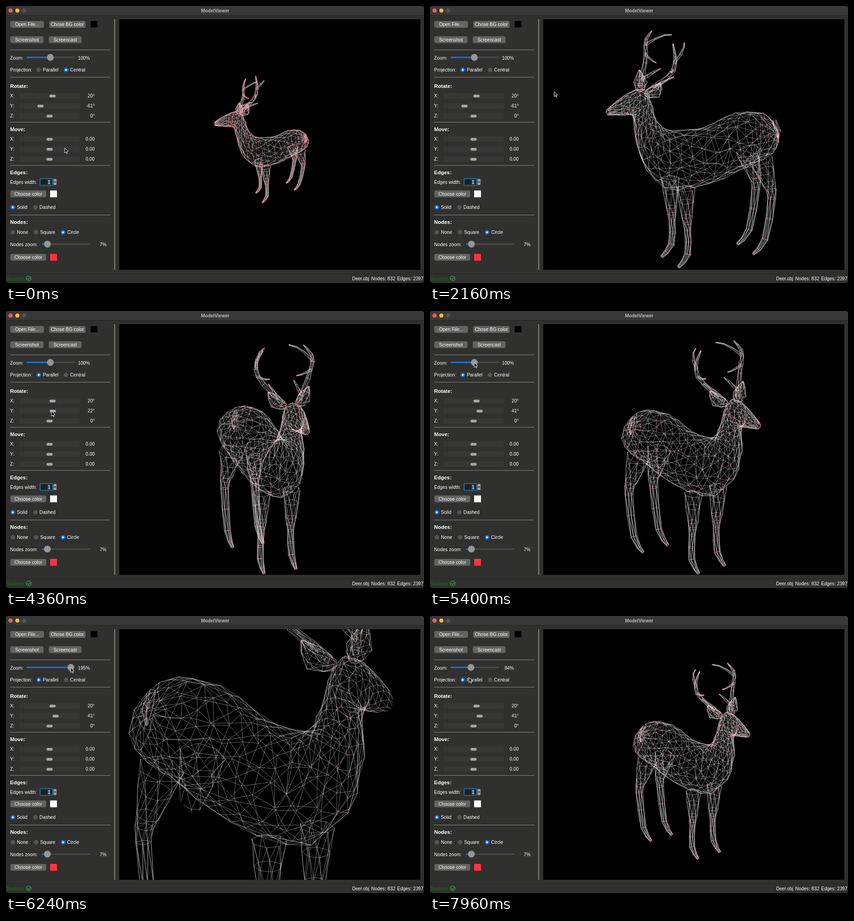
These frames come from a looping animation (919 by 609 pixels, 8000 ms). An HTML page with a canvas:

```html
<!DOCTYPE html>
<html lang="en">
<head>
<meta charset="utf-8">
<title>ModelViewer</title>
<style>
  html, body { margin: 0; width: 100%; height: 100%; overflow: hidden; background: #000; }
  canvas { display: block; }
</style>
</head>
<body>
<canvas id="stage" width="919" height="609"></canvas>
<script>
const ctx = document.getElementById('stage').getContext('2d');
const LOOP = 8000, TAU = Math.PI * 2, RAD = Math.PI / 180;
const TILT = 20, CENTER_X = 580, CENTER_Y = 305, DEPTH_LIMIT = 338;

// ---------- Mesh ----------
const nodes = [], edges = [];
let seed = 7;
const random = () => (seed = (seed * 16807) % 2147483647) / 2147483647;
const jitter = size => (random() - 0.5) * size;
const cross = (a, b) => [a[1] * b[2] - a[2] * b[1], a[2] * b[0] - a[0] * b[2], a[0] * b[1] - a[1] * b[0]];
const resize = (v, length) => v.map(n => n * length / Math.hypot(...v));
const clamp = (v, low, high) => Math.min(Math.max(v, low), high);

// Catmull-Rom curve through the keys, sampled count times.
function smooth(keys, count) {
  const last = keys.length - 1;
  return Array.from({ length: count }, (_, i) => {
    const s = i / (count - 1) * last, k = Math.min(Math.floor(s), last - 1), f = s - k;
    const [a, b, c, d] = [-1, 0, 1, 2].map(o => keys[clamp(k + o, 0, last)]);
    return b.map((p, j) => p + f / 2 * (c[j] - a[j]
      + f * (2 * a[j] - 5 * p + 4 * c[j] - d[j] + f * (3 * (p - c[j]) + d[j] - a[j]))));
  });
}

// Joins elliptic rings {c, u, v} of n points each into a triangulated tube.
function loft(rings, n, noise) {
  const start = nodes.length;
  rings.forEach(({ c, u, v }, r) => {
    const wobble = noise * Math.hypot(...u);
    for (let i = 0; i < n; i++) {
      const a = (i + r % 2 / 2 + jitter(noise * 4)) / n * TAU, along = jitter(wobble);
      nodes.push(c.map((p, k) => p + u[k] * Math.cos(a) + v[k] * Math.sin(a) + (k === 2 ? along : 0)));
      const row = start + r * n, next = (i + 1) % n;
      edges.push([row + i, row + next]);
      if (!r) continue;
      edges.push([row + i, row - n + i]);
      edges.push(r % 2 ? [row + i, row - n + next] : [row + next, row - n + i]);
    }
  });
}

// Round limb along keys [x, y, z, radius].
function limb(keys, count, n, side = 1) {
  const points = smooth(keys, count).map(([x, y, z, r]) => [x * side, y, z, Math.max(r, 1)]);
  loft(points.map((p, i) => {
    const a = points[Math.max(i - 1, 0)], b = points[Math.min(i + 1, count - 1)];
    const axis = [0, 1, 2].map(k => b[k] - a[k]);
    const u = resize(cross(axis, [1, 0, 0]), p[3]);
    return { c: p.slice(0, 3), u, v: resize(cross(axis, u), p[3]) };
  }), n, 0.08);
}

// Rump to nose: top z, top y, bottom z, bottom y, half width.
const torso = [
  [-206, 0, -206, -14, 8],
  [-178, 40, -182, -54, 51],
  [-118, 52, -114, -72, 59],
  [-30, 33, -28, -94, 56],
  [56, 43, 72, -88, 50],
  [92, 68, 132, -10, 36],
  [108, 112, 147, 72, 23],
  [126, 152, 157, 97, 24],
  [170, 144, 177, 101, 19],
  [216, 121, 217, 108, 7]
];
loft(smooth(torso, 28).map(([zt, yt, zb, yb, w]) => ({
  c: [0, (yt + yb) / 2, (zt + zb) / 2],
  u: [0, (yt - yb) / 2, (zt - zb) / 2],
  v: [w, 0, 0]
})), 14, 0.16);

const tail = [[0, 20, -202, 5], [0, -4, -211, 6], [0, -23, -212, 1]];
const frontLeg = [[36, -84, 40, 20], [35, -150, 37, 12], [35, -182, 35, 7], [37, -238, 36, 7], [38, -264, 60, 3]];
const hindLeg = [[30, -52, -152, 27], [33, -112, -171, 14], [36, -145, -176, 9], [36, -238, -159, 7], [36, -267, -129, 3]];
const ear = [[14, 146, 128, 6], [33, 155, 116, 15], [48, 179, 110, 1]];
const eye = [[13, 135, 159, 4], [18, 135, 159, 8], [21, 135, 159, 3]];
const beam = [[18, 153, 125, 6], [57, 198, 90, 5], [67, 236, 84, 4], [48, 265, 79, 1]];
const tines = [
  [[66, 228, 84, 4], [52, 247, 56, 2], [29, 255, 40, 1]],
  [[62, 208, 88, 3], [47, 199, 82, 2], [32, 195, 77, 1]],
  [[27, 164, 116, 4], [29, 173, 92, 3], [30, 180, 67, 1]]
];
limb(tail, 3, 4);
for (const side of [1, -1]) {
  limb(frontLeg, 9, 7, side);
  limb(hindLeg, 9, 7, side);
  limb(ear, 5, 7, side);
  limb(eye, 4, 8, side);
  limb(beam, 8, 4, side);
  tines.forEach(tine => limb(tine, 4, 3, side));
}

// ---------- Motion ----------
const progress = (t, from, to) => clamp((t - from) / (to - from), 0, 1);
const ease = (t, from, to) => { const k = progress(t, from, to); return k * k * (3 - 2 * k); };
const axisOffset = degrees => degrees * 0.325;
const zoomOffset = percent => (percent - 100) * 0.474;

const turnAt = t => t < 3240 ? -61 : Math.round(-58 + 81 * ease(t, 3680, 4400) + 18 * ease(t, 4800, 5040));
const zoomAt = t => Math.round(100 + 97 * ease(t, 5640, 6300) - 113 * ease(t, 6640, 7440));

// Free moves as from, to, dx, dy; during drags the cursor follows the knob.
const moves = [
  [40, 840, -59, -174], [1400, 2160, 203, 50], [2400, 3200, -199, 32],
  [5040, 5380, -9, -107], [7480, 7920, -4, 22]
];
function cursorAt(t, turn, zoom) {
  let x = 129 + axisOffset(Math.max(turn, -58) + 58) + zoomOffset(zoom);
  let y = 312 + 62 * Math.sin(Math.PI * progress(t, 2400, 3200));
  for (const [from, to, dx, dy] of moves) {
    x += dx * ease(t, from, to);
    y += dy * ease(t, from, to);
  }
  return [x, y];
}

// ---------- Drawing helpers ----------
function text(string, x, y, { size = 10.3, align = 'left', color = '#fff', style = '' } = {}) {
  ctx.font = `${style} ${size}px "Liberation Sans", Arial, sans-serif`;
  ctx.textAlign = align;
  ctx.fillStyle = color;
  ctx.fillText(string, x, y + size * 0.36);
}
function box(x, y, w, h, color, radius = 0) {
  ctx.fillStyle = color;
  ctx.beginPath();
  ctx.roundRect(x, y, w, h, radius);
  ctx.fill();
}
function dot(x, y, r, color) {
  ctx.fillStyle = color;
  ctx.beginPath();
  ctx.arc(x, y, r, 0, TAU);
  ctx.fill();
}
function polyline(points, color, width) {
  ctx.strokeStyle = color;
  ctx.lineWidth = width;
  ctx.beginPath();
  points.forEach(p => ctx.lineTo(p[0], p[1]));
  ctx.stroke();
}
function button(label, x, y, w) {
  box(x, y, w, 15, '#636363', 3.5);
  text(label, x + w / 2, y + 7.5, { align: 'center' });
}
function colorButton(y, color) {
  button('Choose color', 9.5, y, 79);
  box(97, y, 15, 15, color);
}
function radio(label, x, y, on) {
  dot(x, y, 5, on ? '#1874e4' : '#555');
  if (on) dot(x, y, 2, '#fff');
  text(label, x + 9, y);
}
function roundSlider(label, y, knob, left, value, right) {
  text(label, 9, y + 1);
  box(left, y - 1.5, 107, 3, '#484848', 1.5);
  box(left, y - 1.5, knob - left, 3, '#1d6ce0', 1.5);
  dot(knob, y, 7.5, '#969696');
  text(value, right, y + 1, { align: 'right' });
}
function axisSliders(title, top, values, format) {
  heading(title, top);
  values.forEach((value, i) => {
    const y = top + 21.5 + i * 22;
    text('XYZ'[i] + ':', 9, y);
    box(30, y - 6, 132, 12, '#373737', 2);
    box(89 + axisOffset(value), y - 2.5, 13.5, 6, '#a6a6a6', 3);
    text(format(value), 195, y, { align: 'right' });
  });
}
const heading = (label, y) => text(label, 9, y, { size: 11.5, style: 'bold' });

// ---------- Interface ----------
function drawInterface(turn, zoom, central) {
  ctx.clearRect(0, 0, 919, 609);
  box(0, 0, 919, 609, '#30302f', 5);
  box(0, 0, 919, 20, '#3a393a', [5, 5, 0, 0]);
  box(0, 20, 919, 1, '#232323');
  ['#fe5f58', '#febc2f', '#575657'].forEach((color, i) => dot(10 + i * 15, 10, 4.5, color));
  text('ModelViewer', 460, 10, { size: 10.2, align: 'center', style: 'bold', color: '#b9b9b9' });

  button('Open File...', 9.5, 33, 74);
  button('Chose BG color', 95, 33, 80);
  box(186, 33, 15, 14, '#000');
  button('Screenshot', 9.5, 66.5, 73);
  button('Screencast', 94, 66.5, 72);
  for (const y of [96, 156, 255, 350, 459]) box(9, y, 220, 1, '#8e8e80');
  box(238, 29, 2, 551, '#85857c');

  roundSlider('Zoom:', 113, 97.5 + zoomOffset(zoom), 45, zoom + '%', 184.5);
  text('Projection:', 9, 140);
  radio('Parallel', 72, 140.5, !central);
  radio('Central', 132, 140.5, central);
  axisSliders('Rotate:', 176, [TILT, turn, 0], v => v + '°');
  axisSliders('Move:', 271, [0, 0, 0], v => v.toFixed(2));

  heading('Edges:', 366);
  text('Edges width:', 9, 387);
  box(74, 378.5, 29.5, 17, '#1f6f96', 2);
  box(76, 380.5, 25.5, 13, '#1c1e20');
  box(91, 381.5, 7.5, 11, '#34495c');
  text('1', 97.5, 387, { align: 'right' });
  box(103.5, 379.5, 8.5, 15, '#686868', 3);
  for (const way of [-1, 1]) {
    const y = 387 + way * 2.5;
    polyline([[105.5, y], [107.7, y + way * 2.5], [110, y]], '#e6e6e6', 1.2);
  }
  colorButton(405.5, '#fff');
  radio('Solid', 15, 442.5, true);
  radio('Dashed', 64.5, 442.5, false);

  heading('Nodes:', 475);
  radio('None', 15, 497.5, false);
  radio('Square', 66, 497.5, false);
  radio('Circle', 125.5, 497.5, true);
  roundSlider('Nodes zoom:', 523.5, 91, 79, '7%', 221);
  colorButton(545, '#ff3340');

  box(0, 588, 919, 1, '#252525');
  text('Success', 1, 599.5, { style: 'italic', color: '#0b7a12' });
  dot(50, 599, 5.8, '#2fae55');
  dot(50, 599, 4.6, '#30302f');
  polyline([[47.3, 599], [49.3, 601.2], [52.8, 597]], '#2fae55', 1.3);
  text('Deer.obj', 761, 599.5, { size: 10 });
  text('Nodes: 832', 803, 599.5);
  text('Edges: 2397', 860, 599.5);
}

// ---------- Model ----------
function clipEnd(p, q) {
  if (Math.abs(p[2]) <= DEPTH_LIMIT) return p;
  const k = (Math.sign(p[2]) * DEPTH_LIMIT - p[2]) / (q[2] - p[2]);
  return p.map((v, i) => v + (q[i] - v) * k);
}
function drawModel(turn, zoom, central) {
  const cosTurn = Math.cos(turn * RAD), sinTurn = Math.sin(turn * RAD);
  const cosTilt = Math.cos(TILT * RAD), sinTilt = Math.sin(TILT * RAD);
  const scale = zoom / 100;
  const projected = nodes.map(([x, y, z]) => {
    const toward = z * cosTurn - x * sinTurn;
    const depth = (y * sinTilt + toward * cosTilt) * scale;
    const s = scale * (central ? 306 / (617 - depth) : 1);
    return [
      CENTER_X + s * (x * cosTurn + z * sinTurn),
      CENTER_Y - s * (y * cosTilt - toward * sinTilt),
      depth
    ];
  });

  ctx.save();
  ctx.beginPath();
  ctx.rect(249, 29, 662, 551);
  ctx.fillStyle = '#000';
  ctx.fill();
  ctx.clip();
  for (const [i, j] of edges) {
    const a = projected[i], b = projected[j];
    if (Math.min(a[2], b[2]) > DEPTH_LIMIT || Math.max(a[2], b[2]) < -DEPTH_LIMIT) continue;
    polyline([clipEnd(a, b), clipEnd(b, a)], 'rgba(255,255,255,0.55)', central ? 0.7 : 0.8);
  }
  for (const [x, y, depth] of projected) {
    if (Math.abs(depth) <= DEPTH_LIMIT) dot(x, y, central ? 0.95 : 0.8, 'rgba(255,70,85,0.62)');
  }
  ctx.restore();
}

function drawCursor([x, y]) {
  ctx.beginPath();
  [[0, 0], [0, 11], [2.6, 8.7], [4.3, 12.5], [6, 11.7], [4.4, 8], [7.7, 7.8]]
    .forEach(([dx, dy]) => ctx.lineTo(x + dx, y + dy));
  ctx.closePath();
  ctx.fillStyle = '#000';
  ctx.strokeStyle = '#fff';
  ctx.lineWidth = 1;
  ctx.fill();
  ctx.stroke();
}

function frame() {
  const t = performance.now() % LOOP;
  const turn = turnAt(t), zoom = zoomAt(t);
  drawInterface(turn, zoom, t < 920);
  drawModel(turn, zoom, t < 1120);
  drawCursor(cursorAt(t, turn, zoom));
  requestAnimationFrame(frame);
}
frame();
</script>
</body>
</html>
```
